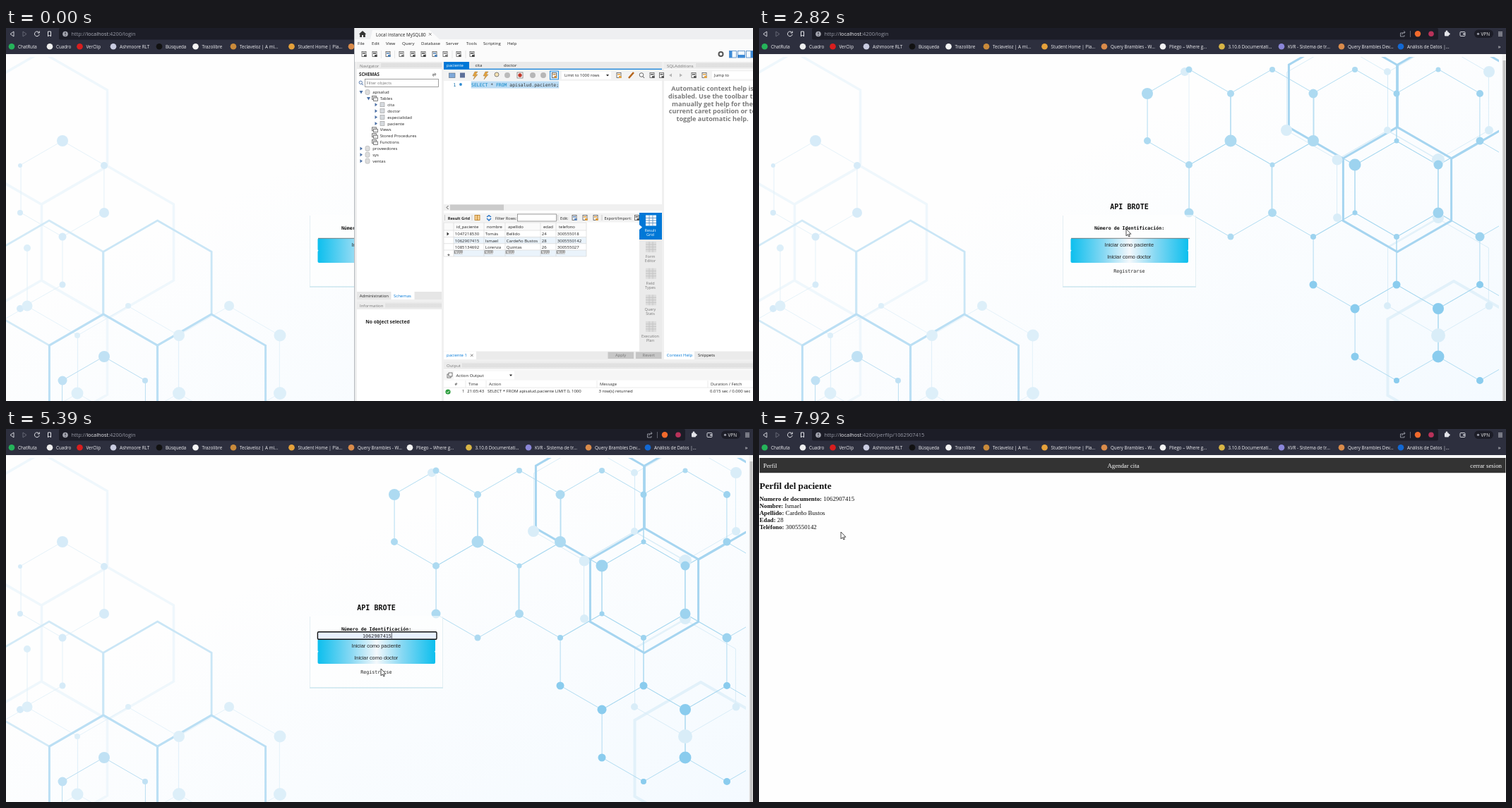
An HTML page for the animation above (7990 ms loop, 1058 px wide and 529 px high).

```html
<!DOCTYPE html>
<html lang="es">
<head>
<meta charset="utf-8">
<title>Inicio de sesión</title>
<style>
html, body { margin: 0; width: 100%; height: 100%; overflow: hidden; background: #fff; }
svg { display: block; width: 1058px; height: 529px; font-family: "Open Sans", "Noto Sans", sans-serif; }
text { white-space: pre; }
.mid { text-anchor: middle; }
.end { text-anchor: end; }
.bold { font-weight: bold; }
.mono { font-family: "DejaVu Sans Mono", monospace; }
.arial { font-family: "Liberation Sans", sans-serif; }
.serif { font-family: "Liberation Serif", serif; }
.line { fill: none; }
</style>
</head>
<body>
<svg viewBox="0 0 1058 529">
  <defs>
    <linearGradient id="paper" x2="1" y2="1">
      <stop offset=".35" stop-color="#fefefe"/><stop offset="1" stop-color="#f4faff"/>
    </linearGradient>
    <linearGradient id="cyan">
      <stop stop-color="#0cbfee"/><stop offset=".28" stop-color="#86d8f3"/><stop offset=".5" stop-color="#f4f8fc"/>
      <stop offset=".72" stop-color="#86d8f3"/><stop offset="1" stop-color="#0cbfee"/>
    </linearGradient>
    <linearGradient id="teal">
      <stop stop-color="#0a87a6"/><stop offset=".28" stop-color="#6fadbd"/><stop offset=".5" stop-color="#f0f2f3"/>
      <stop offset=".72" stop-color="#6fadbd"/><stop offset="1" stop-color="#0a87a6"/>
    </linearGradient>
    <pattern id="grip" width="2" height="2" patternUnits="userSpaceOnUse">
      <rect width="1" height="1" fill="#cfcfcf"/><rect x="1" y="1" width="1" height="1" fill="#dcdcdc"/>
    </pattern>
    <clipPath id="sheet"><rect y="41" width="1048" height="488"/></clipPath>
  </defs>
  <g id="login"></g>
  <g id="form"></g>
  <g id="menu"></g>
  <g id="profile"></g>
  <g id="chrome"></g>
  <g id="workbench"></g>
  <g id="cursor">
    <path id="arrow" d="M0 0V9.8L2.3 7.8 3.9 11 5.3 10.3 3.8 7.2H6.9Z" fill="#fff" stroke="#222" stroke-width=".8"/>
    <path id="hand" d="M-1 1V7.6L-2.4 6.2-3.4 7.4-.6 12.6H4.4L5.4 9V5L4 4.5 2.6 4.1 1 3.8V1Q0-.6-1 1Z" fill="#fff" stroke="#222" stroke-width=".8"/>
    <path id="beam" d="M-1.5-5H1.5M0-5V5M-1.5 5H1.5" stroke="#222" stroke-width=".8"/>
  </g>
</svg>
<script>
const LOOP = 7990;
const USER_ID = '1062907415';
const CHOICES = ['123456', USER_ID, '1234567890', '1047218536', '4725183'];
const TIMES = { maximise: 2150, focus: 3320, pick: 5320, route: 6710, data: 7050 };
const BLUE = '#0078d7', PANEL = '#f0f0f0';

const byId = id => document.getElementById(id);
const put = (id, ...parts) => { byId(id).innerHTML = parts.flat(Infinity).join(''); };
const text = (x, y, s, fill = '#222', size = 6, cls = '', more = '') =>
  `<text x="${x}" y="${y}" fill="${fill}" font-size="${size}" class="${cls}" ${more}>${s}</text>`;
const rect = (x, y, w, h, fill, more = '') =>
  `<rect x="${x}" y="${y}" width="${w}" height="${h}" fill="${fill}" ${more}/>`;
const dot = (x, y, r, fill, more = '') => `<circle cx="${x}" cy="${y}" r="${r}" fill="${fill}" ${more}/>`;
const line = (d, stroke, width = 1, more = '') =>
  `<path class="line" d="${d}" stroke="${stroke}" stroke-width="${width}" ${more}/>`;
const group = (id, ...parts) => `<g id="${id}">${parts.flat(Infinity).join('')}</g>`;

// Pointy-topped hexagons around the given centres.
function hexes(centres, radius, stroke, width) {
  const d = centres.map(([cx, cy]) => 'M' + [0, 1, 2, 3, 4, 5].map(k => {
    const a = (k * 60 - 90) * Math.PI / 180;
    return `${(cx + radius * Math.cos(a)).toFixed(1)} ${(cy + radius * Math.sin(a)).toFixed(1)}`;
  }).join('L') + 'Z').join('');
  return line(d, stroke, width);
}
const dots = (list, fill) => list.map(([x, y, r]) => dot(x, y, r, fill));

function drawBackground() {
  return [
    rect(0, 37, 1058, 492, '#fefefe'), rect(0, 41, 1053, 488, 'url(#paper)'),
    '<g clip-path="url(#sheet)">',
    hexes([[50, 142], [144, 304], [50, 466]], 108, '#eff7fc', 3.5),
    hexes([[984, 467]], 108, '#e2f1fa', 4),
    hexes([[80, 228]], 68, '#dfeff8', .8),
    hexes([[30, 477], [173, 477], [316, 477]], 82.5, '#e2f1fa', .9),
    hexes([[138.5, 534]], 68, '#b9def2', 1),
    line('M30 313V394M80 296V364L20 398M609 65V262', '#e2f1f9', .9),
    hexes([[819, 104], [962, 104], [890, 228], [962, 353]], 82.5, '#d9edf8', 1),
    hexes([[61, 361.5]], 88.5, '#d3eaf7', 2.8),
    hexes([[214.5, 361.5]], 88.5, '#cae6f6', 2.8),
    hexes([[138, 494.5], [291, 494.5]], 88.5, '#bbdff4', 3),
    hexes([[609, 126.5], [727, 126.5], [668, 228.5], [785, 228.5], [844, 126.5], [903, 228.5], [962, 126.5],
      [962, 330], [844, 330], [903, 432], [1021, 432], [1021, 228.5]], 68, '#a9d9f0', .9),
    hexes([[827, 96.5], [981, 96.5], [904, 229]], 88.5, '#a6d5f0', 3),
    dots([[80, 160, 8], [20, 195, 3], [139, 195, 5], [139, 262, 7], [20, 262, 4], [80, 296, 5.5], [80, 364, 4.5],
      [20, 398, 5]], '#d6ebf8'),
    dots([[30, 312, 5], [30, 394, 7.5], [173, 394, 4], [316, 394, 7], [245, 436, 8], [388, 436, 8.5], [101, 436, 4],
      [245, 518, 9], [388, 518, 9], [101, 518, 8.5]], '#ddeff9'),
    dots([[139, 466, 8], [80, 500, 6.5], [197, 500, 4]], '#c0e1f4'),
    dots([[603, 62, 6], [747, 145, 8], [819, 187, 7.5], [819, 269, 6], [890, 62, 5], [890, 145, 5], [1034, 62, 8],
      [1034, 145, 6], [962, 187, 9], [962, 269, 8], [890, 394, 5], [1034, 394, 5.5], [962, 436, 10]], '#d9edf8'),
    dots([[550, 93, 8], [609, 59, 4.5], [668, 93, 5], [727, 59, 4], [785, 93, 6.5], [550, 160, 5], [668, 160, 8.5],
      [785, 160, 8], [609, 194, 5], [727, 194, 3.5], [609, 262, 6.5], [727, 262, 6], [668, 296, 4.5], [844, 59, 4],
      [962, 59, 3.5]], '#addaf1'),
    dots([[844, 194, 8.5], [844, 262, 3.5], [903, 93, 4.5], [903, 160, 3.5], [962, 194, 6.5], [962, 262, 7.5],
      [785, 296, 4], [903, 296, 4], [1021, 93, 5], [1021, 160, 5.5], [1021, 296, 6.5]], '#9dd3ef'),
    dots([[785, 364, 5.5], [844, 398, 6.5], [903, 364, 5.5], [962, 398, 8], [1021, 364, 5], [844, 466, 5.5],
      [962, 466, 8.5], [903, 500, 4], [1021, 500, 5]], '#8accee'),
    '</g>',
    rect(1052.5, 37, 6, 492, '#f1f1f1'), rect(1053.5, 46, 4, 483, '#c4c4c4')
  ];
}

function drawForm() {
  return [
    text(524.5, 256.5, 'API BROTE', '#111', 10.1, 'mono bold mid'),
    rect(430.5, 265, 188, 101.5, '#fff', 'fill-opacity=".55"'),
    line('M430.5 266V366M618.5 266V366', '#e4eff3', 1), line('M430 367H619', '#cbe6ee', 1.6),
    text(524.5, 286, 'Número de Identificación:', '#111', 6.6, 'mono bold mid'),
    rect(441.5, 298, 166.5, 18, 'url(#cyan)', 'id="button0" rx="2"'),
    rect(441.5, 315.5, 166.5, 17.5, 'url(#cyan)', 'id="button1" rx="2"'),
    line('M442 298.3H610', '#777', .9),
    text(524.3, 310, 'Iniciar como paciente', '#222', 7.35, 'arial mid'),
    text(524.3, 327, 'Iniciar como doctor', '#222', 7.35, 'arial mid'),
    text(524.3, 347, 'Registrarse', '#222', 6.7, 'mono mid'),
    group('field',
      rect(441.4, 287.8, 168.6, 10.4, '#fff', 'id="box" rx="1.5" stroke="#111" stroke-width="1.4"'),
      text(525.5, 295.6, '', '#222', 7.4, 'mid', 'id="value"'),
      line('M0 289V297', '#222', .7, 'id="caret"'))
  ];
}

function drawMenu() {
  return [
    rect(495.5, 304, 60.5, 105.5, '#888', 'rx="2" opacity=".35"'),
    '<path d="M502 304.5L507 299.5 512 304.5Z" fill="#27282b"/>',
    rect(495.5, 304, 60, 104.5, '#27282b', 'rx="2"'),
    rect(495.5, 306.5, 60, 20, '#3e3f42', 'id="hover"'),
    CHOICES.map((s, i) => text(502.3, 319 + 20 * i, s, '#f4f4f4', 6.8))
  ];
}

function drawProfile() {
  const fields = [['Numero de documento', USER_ID], ['Nombre', 'Ismael'], ['Apellido', 'Cardeño Bustos'],
    ['Edad', '28'], ['Teléfono', '3005550142']];
  return [
    rect(0, 37, 1058, 492, '#fefefe'), rect(.7, 41, 1056.8, 21.2, '#333'),
    text(6, 54.6, 'Perfil', '#fff', 8.8, 'serif'),
    text(516, 54.6, 'Agendar cita', '#fff', 8.8, 'serif mid'),
    text(1052, 54.6, 'cerrar sesion', '#fff', 8.8, 'serif end'),
    group('data',
      text(.7, 85, 'Perfil del paciente', '#111', 13.2, 'serif bold'),
      fields.map(([name, value], i) =>
        text(.7, 102 + 10 * i, `<tspan class="bold">${name}:</tspan> ${value}`, '#111', 8.8, 'serif')))
  ];
}

function drawChrome() {
  const bookmarks = [[8, '#25b35a', 'ChatRuta'], [62, '#eee', 'Cuadro'], [104.5, '#d81e1e', 'VerClip'],
    [152, '#c8cbe0', 'Ashmoore RLT'], [217, '#111', 'Búsqueda'], [268.5, '#f4f4f4', 'Trazolibre'],
    [322, '#c98a3a', 'Teclaveloz | A mi...'], [404.5, '#e5a13a', 'Student Home | Pla...'],
    [489, '#d98b4a', 'Query Brambles - W...'], [572, '#f2f2f2', 'Pliego – Where g...'],
    [655.5, '#d8b545', '3.10.6 Documentati...'], [740, '#8a86d8', 'KVR - Sistema de tr...'],
    [825, '#d98b4a', 'Query Brambles Dev...'], [909, '#1268d3', 'Análisis de Datos |...']];
  const pale = '#e4e5ea';
  return [
    rect(0, 0, 1058, 37, '#2d2f3e'), rect(75, 0, 887, 16.5, '#1c1d27', 'rx="2"'),
    line('M11 5L6 8.5 11 12Z', pale, .9), line('M24 5L29 8.5 24 12Z', '#6c6e7b', .9),
    line('M46.5 6.2A3.4 3.4 0 1 0 47.2 9M47.3 4.5V7H44.8', pale, 1),
    line('M59.5 5H63.5V12L61.5 10 59.5 12Z', pale, 1),
    dot(84, 8.5, 3.8, '#a4a6b0'), rect(83.5, 6, 1, 3, '#1c1d27'), rect(83.5, 10, 1, 1, '#1c1d27'),
    text(92.5, 11.2, '', '#9a9ca8', 7.4, '', 'id="url"'),
    line('M912 7H908.5V12H914V10M910.5 9.5Q911 6 915 6M913.2 4.2L915.2 6 913.2 7.8', '#a9abb5', .8),
    line('M922.5 4V13', '#70727e', .8), dot(933, 8.3, 4.2, '#f26a2c'), dot(952, 8.3, 3.8, '#b8325a'),
    rect(971, 5.5, 6, 6, pale, 'rx="1"'), dot(974, 5, 1.4, pale), dot(977.3, 8.5, 1.4, pale),
    rect(993, 5.5, 7, 6, 'none', `rx="1" stroke="${pale}" stroke-width=".9"`), rect(997, 7.7, 3, 1.6, pale),
    rect(1013, 2.5, 27, 11.5, '#1c1d27', 'rx="5.7"'), dot(1018.5, 8.3, 1.6, '#9a9ca8'),
    text(1022.5, 10.7, 'VPN', '#eee', 6.4), line('M1047 6H1053M1047 8.5H1053M1047 11H1053', pale, 1),
    bookmarks.map(([x, fill, name]) => [dot(x, 26.3, 4.3, fill), text(x + 9, 28.6, name, '#f0f0f3', 6.25)]),
    text(1046.5, 28.6, '»', '#f0f0f3', 8)
  ];
}

const icon = (x, y, tint = '#999') => [
  rect(x - 3, y - 3.5, 6, 7, '#f8f8f8', 'stroke="#555" stroke-width=".8"'),
  rect(x - 2, y - 2, 4, 1.5, tint), rect(x, y + 1, 3.6, 3, tint)];
const icons = (xs, y, tints) => xs.map((x, i) => icon(x, y, tints[i % tints.length]));
const heading = (x, y, w, label, gap) => [rect(x, y, w, 10, '#ececec'),
  rect(x + gap, y + 2, w - gap, 6, 'url(#grip)'), text(x + 4, y + 7.7, label, '#777')];
const combo = (x, y) => `<path d="M${x - 2} ${y - 1}H${x + 2}L${x} ${y + 1.5}Z" fill="#222"/>`;

function drawNavigator() {
  const tree = [[0, 'apisalud'], [1, 'Tables'], [2, 'cita'], [2, 'doctor'], [2, 'especialidad'], [2, 'paciente'],
    [1, 'Views'], [1, 'Stored Procedures'], [1, 'Functions'], [0, 'proveedores'], [0, 'sys'], [0, 'ventas']];
  const branch = ([depth, name], i) => {
    const y = 91 + 8.88 * i, x = 512 + 10.5 * depth, ax = x - 9;
    const shape = i < 2 ? `M${ax - 2.5} ${y - 2}H${ax + 2.5}L${ax} ${y + 2.5}Z`
      : `M${ax - 1.5} ${y - 2.5}V${y + 2.5}L${ax + 2} ${y}Z`;
    const art = depth === 0 ? rect(x - 3, y - 3.5, 6, 7, '#ddd', 'rx="2" stroke="#aaa" stroke-width=".6"')
      : depth === 1 ? [rect(x - 4, y - 3.5, 6, 5, '#ddd', 'stroke="#666" stroke-width=".8"'),
        rect(x - 2, y - 1, 6, 4.5, '#eee', 'stroke="#666" stroke-width=".8"')]
      : rect(x - 3, y - 3, 6, 6, '#d6dade', 'stroke="#999" stroke-width=".6"');
    return [depth === 1 && i > 1 ? '' : `<path d="${shape}" fill="#4a6fa5"/>`, art,
      text(x + 7.2, y + 2.2, name)].flat();
  };
  return [
    heading(497, 48, 120, 'Navigator', 34), rect(497, 58, 120, 316, '#fff'),
    text(500, 68, 'SCHEMAS', '#222', 6.15, 'bold'),
    line('M604 65.5H609M607 63.5L609 65.5M609 67H604L606 68.5', '#666', .8),
    line('M504 79L506 81.2', '#4a6fa5', 1), dot(502.3, 77.3, 2.2, 'none', 'stroke="#4a6fa5" stroke-width=".9"'),
    rect(508.5, 72.5, 104, 11, '#fff', 'stroke="#888" stroke-width=".8"'), text(510.5, 80.3, 'Filter objects', '#777'),
    tree.map(branch),
    rect(497, 374, 120, 11, '#e6e6e6'), rect(545.5, 374, 33, 11, '#fff'),
    text(500.7, 381.6, 'Administration'), text(549, 381.6, 'Schemas', BLUE),
    heading(497, 388.5, 120, 'Information', 40), rect(497, 399, 120, 130, '#fff'),
    text(509.3, 419, 'No object selected', '#222', 6.8, 'bold')
  ];
}

function drawEditor() {
  return [
    rect(620, 48, 309, 10, '#eaeaea'), rect(620, 48, 36, 10, BLUE), rect(620, 57.7, 309, 1.2, BLUE),
    text(624, 55.4, 'paciente', '#fff'), text(664.5, 55.4, 'cita'), text(705, 55.4, 'doctor'),
    rect(620, 59, 309, 16, '#f3f3f3'),
    rect(627.5, 64, 8.5, 6.5, '#7fa8d9', 'stroke="#567" stroke-width=".6"'), rect(643, 63.5, 7, 7, '#5c6f99'),
    [664, 679].map(x => `<path d="M${x} 62L${x - 3} 68H${x}L${x - 2} 73 ${x + 4} 66H${x + 1}L${x + 4} 62Z" fill="#e6a23c" stroke="#8a6d3b" stroke-width=".4"/>`),
    dot(695, 66, 3, '#f7e3b5', 'stroke="#666" stroke-width=".8"'), dot(710, 67, 4, '#bbb'),
    rect(724, 63, 8, 8, '#fff', 'stroke="#666" stroke-width=".7"'), dot(728, 67, 2.7, '#c0392b'),
    dot(746, 67, 4, '#b7b7b7'), dot(761, 67, 4, '#b7b7b7'),
    rect(770.5, 61, 12, 12, '#cde6fa', `stroke="${BLUE}" stroke-width=".8"`), icon(776.5, 67, '#c98a3a'),
    rect(787, 61.5, 70, 11, '#fff'), text(791, 69.4, 'Limit to 1000 rows', '#222', 5.8), combo(852, 67),
    icon(868, 67, '#e6a23c'), line('M882 71L889 63', '#b5651d', 2.5),
    dot(900, 66.5, 2.8, '#fff', 'stroke="#555" stroke-width=".9"'), line('M902 68.5L904 71', '#555', 1),
    icon(915, 67, '#555'), icon(928.5, 67, '#555'),
    rect(620, 75, 309, 175, '#fff'), rect(658.7, 75.5, 124.5, 10, '#bcdcf4'),
    text(633.5, 82.8, '1', '#0a6aa8', 6.4, 'mono'), dot(644, 80, 1.9, '#2e8ad0'),
    text(659, 82.8, '<tspan fill="#0884c7">SELECT</tspan> * <tspan fill="#0884c7">FROM</tspan> apisalud.paciente;', '#333', 6.44, 'mono'),
    rect(620, 250, 309, 9, PANEL), line('M626.5 252L624 254.5 626.5 257', '#444', .9), rect(629, 250.5, 76, 8, '#cbcbcb')
  ];
}

function drawResults() {
  const columns = [634, 677, 707, 757, 779, 822];
  const rows = [['id_paciente', 'nombre', 'apellido', 'edad', 'telefono'],
    ['1047218530', 'Tomás', 'Bellido', '24', '300555018'],
    [USER_ID, 'Ismael', 'Cardeño Bustos', '28', '3005550142'],
    ['1085134692', 'Lorenza', 'Quintas', '26', '300555027']];
  const tabs = [['Result', 'Grid'], ['Form', 'Editor'], ['Field', 'Types'], ['Query', 'Stats'], ['Execution', 'Plan']];
  return [
    rect(620, 259, 309, 211, '#fff'), rect(620, 262.5, 277, 13, '#f3f3f3'),
    line('M621.5 265V273M660 265V273M781.5 265V273M844 265V273', '#bbb', .7),
    text(625.7, 271.6, 'Result Grid', '#222', 5.7, 'bold'),
    rect(664, 265.5, 7, 7, '#f5cf91', 'stroke="#b8791e" stroke-width=".8"'), line('M667.5 265V273', '#b8791e', .8),
    line('M681 268L684 266 687 268M681 270L684 273 687 270', '#2472c8', 1.5),
    text(693, 271.6, 'Filter Rows:', '#222', 5.7), rect(724.5, 264, 55, 10, '#fff', 'stroke="#777" stroke-width=".7"'),
    text(785, 271.6, 'Edit:', '#222', 5.7), icons([805, 820, 835], 269, ['#5a86c0', '#e09a35', '#e09a35']),
    text(847.5, 271.6, 'Export/Import:', '#222', 5.6), icon(893.5, 269, '#555'),
    rect(620, 276, 202, 11, '#fafafa'), rect(634, 296.5, 188, 9.2, '#eaf3fb'), rect(634, 315, 188, 9, '#eaf3fb'),
    line('M620 276H822M620 287H822M620 296.5H822M620 305.7H822M620 315H822M620 324H822M620 276V324'
      + columns.map(x => `M${x} 276V324`).join(''), '#d9d9d9', .7),
    rows.map((cells, r) => cells.map((s, c) =>
      text(columns[c] + (r ? 1.8 : 4), r ? 285 + 9.3 * r : 283.8, s, '#222', r ? 6 : 5.9))),
    '<path d="M624.5 289.5V294.5L627.5 292Z" fill="#333"/>', text(625, 325, '*', '#333', 7),
    columns.slice(0, 5).map(x => [rect(x + .8, 315.3, 12, 5, '#858585'),
      text(x + 1.7, 319.6, 'NULL', '#fff', 4.4, 'bold')]),
    rect(897, 262, 32, 197, '#ebebeb'), rect(897, 262, 32, 38, BLUE),
    '<path d="M897 279L901 282.5 897 286Z" fill="#fff"/>',
    tabs.map(([a, b], i) => {
      const y = 288.5 + 37.6 * i, ink = i ? '#777' : '#fff', fill = i ? '#dcdcdc' : '#fff', rule = i ? '#c4c4c4' : '#5a8fc0';
      return [rect(906, y - 23, 15, 15, fill), line(`M906 ${y - 19}H921M906 ${y - 15.5}H921M906 ${y - 12}H921M911 ${y - 23}V${y - 8}M916 ${y - 23}V${y - 8}`, rule, .9),
        text(912.5, y, a, ink, 5.5, 'mid'), text(912.5, y + 6, b, ink, 5.5, 'mid')];
    }),
    rect(620, 458.5, 309, 11.5, '#ebebeb'), rect(620, 458.5, 46, 11.5, '#fff'),
    text(624, 466.2, 'paciente 1', BLUE), line('M658 462.5L661.5 466M661.5 462.5L658 466', '#666', .8),
    [[852.5, 'Apply'], [892, 'Revert']].map(([x, s]) =>
      [rect(x, 459.5, 36.5, 9.5, '#c6c6c6'), text(x + 18.2, 466.3, s, '#777', 5.8, 'mid')])
  ];
}

function drawHelp() {
  const lines = ['Automatic context help is', 'disabled. Use the toolbar to', 'manually get help for the',
    'current caret position or to', 'toggle automatic help.'];
  return [
    heading(932, 48, 126, 'SQLAdditions', 45), rect(932, 58, 126, 412, '#fff'), rect(932, 59, 126, 16, '#f3f3f3'),
    '<path d="M943 64.5V69.5L939 67ZM954 64.5V69.5L958 67Z" fill="#b5b5b5"/>',
    icons([974, 989], 67, ['#555', '#e6a23c']),
    rect(1000, 61.5, 60, 11, '#fff'), text(1003, 69.4, 'Jump to', '#222', 5.8),
    lines.map((s, i) => text(1000.5, 89.2 + 10.65 * i, s, '#7b7b7b', 9.1, 'bold mid')),
    rect(932, 458.5, 126, 11.5, '#ebebeb'), rect(932, 458.5, 43, 11.5, '#fff'),
    text(935.8, 466.2, 'Context Help', BLUE), text(980, 466.2, 'Snippets')
  ];
}

function drawOutput() {
  const head = [[635.5, '#'], [655, 'Time'], [684, 'Action'], [841, 'Message'], [998, 'Duration / Fetch']];
  const row = [[646, '1'], [653.3, '21:05:43'], [682, 'SELECT * FROM apisalud.paciente LIMIT 0, 1000'],
    [839.5, '3 row(s) returned'], [997, '0.015 sec / 0.000 sec']];
  return [
    heading(620, 473.5, 438, 'Output', 26), rect(620, 484, 438, 45, '#fff'), rect(620, 485, 438, 14.5, '#f6f6f6'),
    rect(625, 491, 5, 5, '#fff', 'stroke="#555" stroke-width=".8"'), rect(627, 489, 5, 5, '#fff', 'stroke="#555" stroke-width=".8"'),
    rect(634, 486.5, 86, 12, '#fff'), text(637.5, 495, 'Action Output'), combo(715, 492.5),
    line('M620 510H1058M651 500V510M680 500V510M837 500V510M994 500V510', '#e2e2e2', .7),
    head.map(([x, s]) => text(x, 507, s, '#333', 5.9)), row.map(([x, s]) => text(x, 517.4, s, '#222', 6)),
    dot(626, 516, 3.6, '#2e9e3f'), line('M624.3 516L625.6 517.4 627.8 514.7', '#fff', .9)
  ];
}

function drawWorkbench() {
  const menus = [[498, 'File'], [518, 'Edit'], [538, 'View'], [561, 'Query'], [588, 'Database'], [623, 'Server'],
    [652, 'Tools'], [676, 'Scripting'], [710, 'Help']];
  return [
    rect(493, 0, 565, 529, PANEL), rect(493, 0, 1.2, 529, '#b9bdc1'),
    rect(494, 0, 564, 16, '#eeeff1'), rect(494, 16, 564, 32, '#fbfbfb'),
    '<path d="M516 16L519 3H600L614 16Z" fill="#fbfbfb"/>',
    '<path d="M499.8 8.8L505 4 510.2 8.8H508.8V13H506V10H504V13H501.2V8.8Z" fill="#333"/>',
    text(524, 11.5, 'Local instance MySQL80', '#222', 6.3), line('M599 7L602.5 10.5M602.5 7L599 10.5', '#666', .8),
    menus.map(([x, s]) => text(x, 24.2, s, '#222', 6.15)),
    icons([507, 522, 541, 560, 576, 591, 607, 622, 641, 660], 37, ['#555', '#444', '#4a7fb5', '#777']),
    line('M531.5 32V43M550.5 32V43M632 32V43M651 32V43', '#ddd', .7),
    dot(1012.5, 37, 3, '#fff', 'stroke="#555" stroke-width="2"'),
    [1024.5, 1036.5, 1048.5].map((x, i) => [rect(x, 32.5, 10, 9.5, '#f4f9fd', 'stroke="#4a86c5" stroke-width=".8"'),
      i === 1 ? rect(x, 38, 10, 4, '#3d8ad6') : rect(x + (i ? 6 : 0), 32.5, 4, 9.5, '#3d8ad6')]),
    drawNavigator(), drawEditor(), drawResults(), drawHelp(), drawOutput()
  ];
}

put('login', drawBackground());
put('form', drawForm());
put('menu', drawMenu());
put('profile', drawProfile());
put('chrome', drawChrome());
put('workbench', drawWorkbench());

// Pointer moves: first change, last change, number of steps, end point.
const MOVES = [
  [210, 410, 4, 935, 467], [730, 940, 4, 684, 369], [1210, 1350, 3, 554, 231], [1680, 2010, 6, 461, 209],
  [2280, 2820, 9, 520, 285], [2890, 2890, 1, 522, 288], [2960, 3250, 5, 527, 292],
  [3520, 3720, 4, 527, 312], [3780, 4370, 9, 528, 351], [4510, 4580, 2, 531, 343], [4650, 4920, 4, 531, 340],
  [5460, 5910, 7, 531, 313], [6000, 6050, 2, 532, 310], [6380, 6380, 1, 531, 309],
  [7380, 7590, 4, 308, 183], [7850, 7920, 2, 116, 146]
];

function pointerAt(t) {
  let x = 1058, y = 529;
  for (const [start, end, steps, toX, toY] of MOVES) {
    if (t < start) break;
    const step = Math.floor((t - start) / Math.max(1, end - start) * (steps - 1) + 1e-6) + 1;
    const p = Math.min(1, step / steps);
    x += (toX - x) * p;
    y += (toY - y) * p;
  }
  return [x, y];
}

const show = (id, on) => { byId(id).style.display = on ? '' : 'none'; };

function render(t) {
  const [x, y] = pointerAt(t);
  const onLogin = t < TIMES.route;
  const maximised = t >= TIMES.maximise;
  const focused = t >= TIMES.focus && onLogin;
  const picked = t >= TIMES.pick;
  const open = focused && !picked;
  const row = open && y >= 306.5 ? Math.floor((y - 306.5) / 20) : -1;
  const button = onLogin && maximised && !open && y >= 299 && y < 333 ? (y < 316 ? 0 : 1) : -1;
  const overField = onLogin && maximised && !picked && y > 288 && y < 299;

  show('workbench', !maximised);
  ['login', 'form'].forEach(id => show(id, onLogin));
  show('profile', !onLogin);
  show('data', t >= TIMES.data);
  show('menu', open);
  show('field', focused);

  const host = `<tspan fill="${maximised ? '#f2f2f5' : '#b4b6c0'}">localhost</tspan>`;
  byId('url').innerHTML = `http://${host}:4200/${onLogin ? 'login' : 'perfilp/' + USER_ID}`;

  const value = byId('value');
  value.textContent = picked ? USER_ID : CHOICES[row] || '';
  value.setAttribute('class', picked ? 'mono mid' : 'arial mid');
  value.setAttribute('font-size', picked ? 6.8 : 7.4);
  byId('box').setAttribute('fill', value.textContent ? '#e8f0fe' : '#fff');
  byId('caret').setAttribute('transform', `translate(${picked ? 546.3 : 525.7})`);
  show('caret', (t - (picked ? TIMES.pick : TIMES.focus)) % 1060 < 530);

  show('hover', row >= 0);
  byId('hover').setAttribute('y', 306.5 + 20 * row);
  [0, 1].forEach(i => byId('button' + i).setAttribute('fill', `url(#${i === button ? 'teal' : 'cyan'})`));

  byId('cursor').setAttribute('transform', `translate(${x} ${y})`);
  show('hand', button >= 0);
  show('beam', overField);
  show('arrow', button < 0 && !overField);
}

let origin;
function tick(now) {
  origin ??= now;
  render((now - origin) % LOOP);
  requestAnimationFrame(tick);
}
render(0);
requestAnimationFrame(tick);
</script>
</body>
</html>
```
